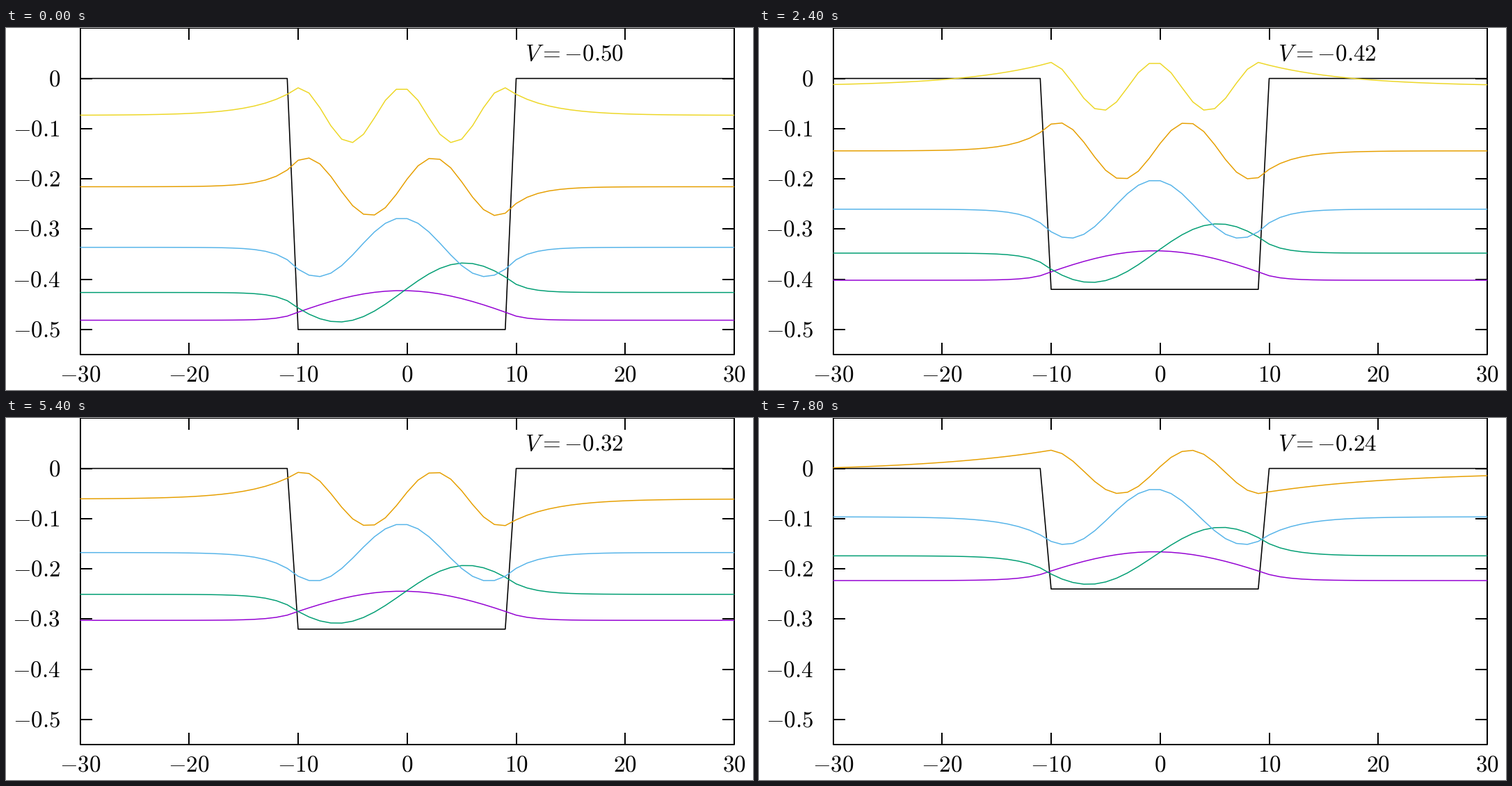
A matplotlib script that plays this animation: 1074 px wide and 521 px high, repeating every 8 s.

```python
import numpy as np
import matplotlib.pyplot as plt
from matplotlib.animation import FuncAnimation

W, H, DPI = 1074, 521, 100
PT = 72 / DPI                       # points per pixel
LEFT, RIGHT, BOTTOM = 106.5, 1047, 470.2
ZERO_Y, SCALE_Y = 72.6, 722.8
TICK = 17
COLORS = ["#9400d3", "#009e73", "#56b4e9", "#e69f00", "#edd726"]
SIGNS = [1, -1, -1, 1, 1]           # sign of each state at the left wall
HALF = 100                          # half width of the lattice
STEP_TICKS = 3                      # 100 ms ticks per value of V

plt.rcParams["mathtext.fontset"] = "cm"


def px(x):
    return LEFT + (np.asarray(x) + 30) * (RIGHT - LEFT) / 60


def py(y):
    return ZERO_Y - np.asarray(y) * SCALE_Y


sites = np.arange(-HALF, HALF + 1)
inside = (sites >= -10) & (sites <= 9)
shown = np.abs(sites) <= 30
kinetic = (2 * np.eye(len(sites))
           - np.eye(len(sites), k=1) - np.eye(len(sites), k=-1))


def solve(v):
    """Bound states of the lattice well as curves E + 0.2 psi."""
    energy, psi = np.linalg.eigh(kinetic + np.diag(np.where(inside, v, 0.0)))
    wall = np.argmax(inside)
    curves = []
    for n, sign in enumerate(SIGNS):
        if energy[n] < 0:
            wave = psi[:, n] * sign * np.sign(psi[wall, n])
            curves.append(energy[n] + 0.2 * wave[shown])
    return curves


depths = [-0.50 + 0.01 * i for i in range(27)]
states = [solve(v) for v in depths]

fig = plt.figure(figsize=(W / DPI, H / DPI), dpi=DPI, facecolor="white")
ax = fig.add_axes([0, 0, 1, 1])
ax.set_xlim(0, W)
ax.set_ylim(H, 0)
ax.axis("off")


def line(xs, ys, color="black", width=1.5, z=2):
    return ax.plot(xs, ys, color=color, lw=width * PT, zorder=z,
                   solid_joinstyle="round", solid_capstyle="butt")[0]


def label(x, y, s, ha):
    return ax.text(x, y, f"${s}$", fontsize=33.2 * PT, ha=ha, va="baseline")


top = py(0.1)
line([LEFT, RIGHT, RIGHT, LEFT, LEFT], [top, top, BOTTOM, BOTTOM, top], width=2)

for x in range(-30, 31, 10):
    if abs(x) < 30:
        line([px(x)] * 2, [top, top + TICK], width=2)
        line([px(x)] * 2, [BOTTOM, BOTTOM - TICK], width=2)
    label(px(x), 508.5, x, "center")

for i in range(6):
    y = py(-i / 10)
    line([LEFT, LEFT + TICK], [y, y], width=2)
    line([RIGHT, RIGHT - TICK], [y, y], width=2)
    label(78, y + 10.5, f"-0.{i}" if i else "0", "right")

title = label(745.5, 46.5, "V", "left")
well = line([], [], width=1.6, z=3)
waves = [line([], [], c, z=4 + n) for n, c in enumerate(COLORS)]
grid_x = px(sites[shown])


def update(tick):
    i = tick // STEP_TICKS
    v = depths[i]
    title.set_text(f"$V={{-}}{-v:.2f}$")
    well.set_data(px([-30, -11, -10, 9, 10, 30]), py([0, 0, v, v, 0, 0]))
    for n, wave in enumerate(waves):
        visible = n < len(states[i])
        wave.set_visible(visible)
        if visible:
            wave.set_data(grid_x, py(states[i][n]))
    return [title, well, *waves]


anim = FuncAnimation(fig, update, frames=80, interval=100,
                     repeat=True, repeat_delay=0, blit=False)
plt.show()
```
